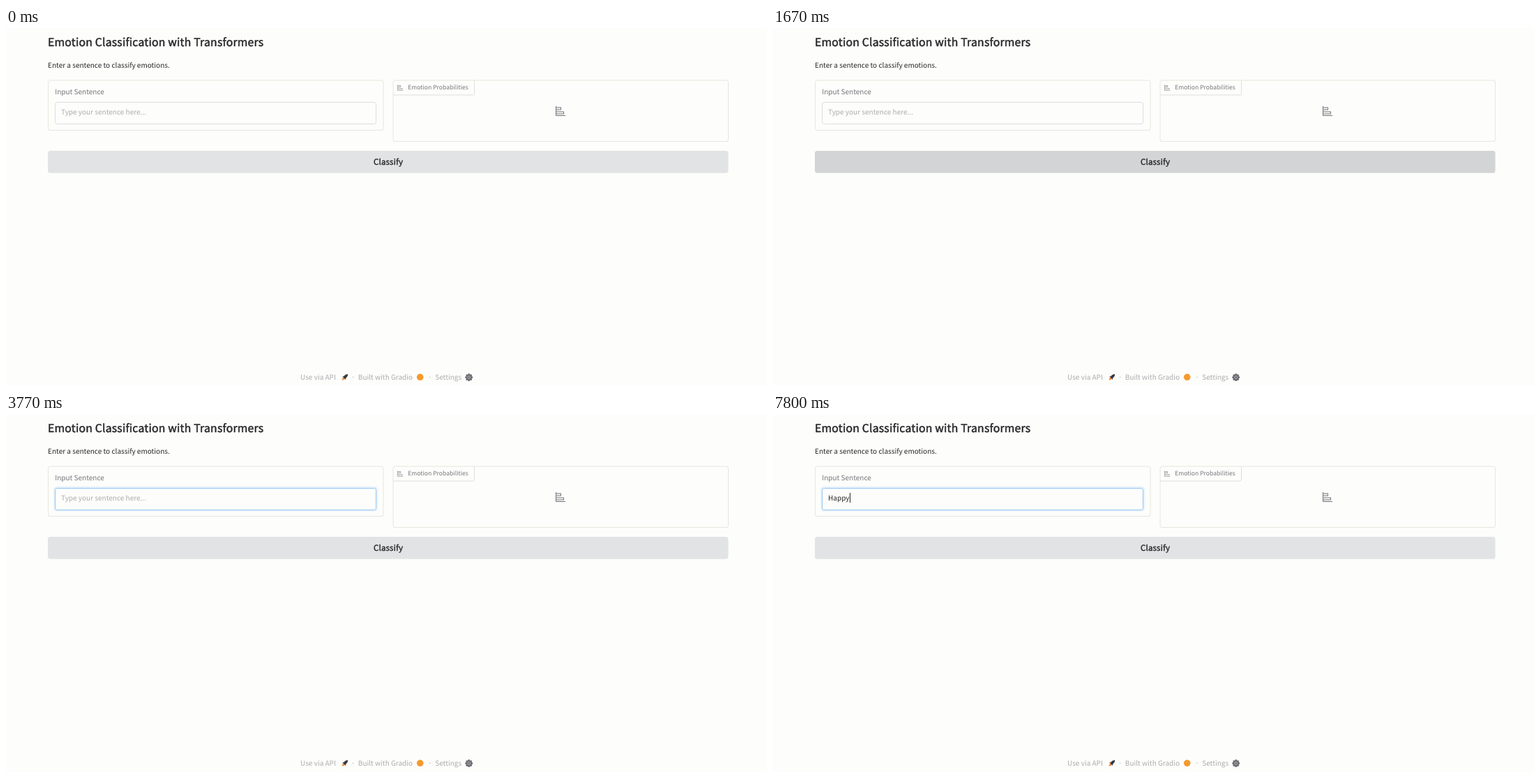
Write an HTML page with a canvas that moves like this. It is 1091 by 513 pixels and loops after 8000 ms.

```html
<!DOCTYPE html>
<html lang="en">
<head>
<meta charset="utf-8">
<title>Emotion Classification</title>
<style>
  html, body { margin: 0; width: 100%; height: 100%; overflow: hidden; background: #fdfdfb; }
  canvas { display: block; }
</style>
</head>
<body>
<canvas id="stage" width="1091" height="513"></canvas>
<script>
const ctx = document.getElementById('stage').getContext('2d');
const LOOP = 8000;
const BG = '#fdfdfb';
const INK = '#27272a';
const LABEL = '#76767c';
const FAINT = '#acacb0';
const FAMILY = '"Noto Sans CJK JP", "Noto Sans CJK SC", "Noto Sans CJK KR", "Noto Sans CJK TC", "Noto Sans CJK", sans-serif';
// The Latin glyphs in this family are drawn larger than their nominal em.
const EM = 1 / 1.117;

const chartIcon = new Path2D('M4 2H2v26a2 2 0 0 0 2 2h26v-2H4v-3h22v-8H4v-4h14V5H4zm20 17v4H4v-4zM16 7v4H4V7z');

// [start time, text in the box]
const typing = [
  [0, ''], [4230, 'H'], [4770, 'Ha'], [4870, 'Haa'], [4970, 'Ha'],
  [5300, 'Haa'], [6170, 'Ha'], [6630, 'Hap'], [6930, 'Happy']
];
// Times at which the caret toggles, starting hidden.
const blinks = [2230, 2770, 3270, 3770, 4230, 5800, 6170, 7430, 7730];

const clamp = v => Math.min(1, Math.max(0, v));
const ramp = (t, from, to) => {
  const p = clamp((t - from) / (to - from));
  return p * p * (3 - 2 * p);
};
const mix = (a, b, p) => `rgb(${a.map((v, i) => v + (b[i] - v) * p).join(',')})`;

function setFont(size) {
  ctx.font = `400 ${size * EM}px ${FAMILY}`;
  ctx.textRendering = 'geometricPrecision';
  ctx.fontKerning = 'normal';
}

function text(str, x, y, size, color, { align = 'left', weight = 0, spacing = 0 } = {}) {
  setFont(size);
  ctx.letterSpacing = spacing + 'px';
  ctx.textAlign = align;
  ctx.fillStyle = ctx.strokeStyle = color;
  ctx.fillText(str, x, y);
  if (weight) {
    ctx.lineWidth = weight;
    ctx.lineJoin = 'round';
    ctx.strokeText(str, x, y);
  }
  ctx.letterSpacing = '0px';
}

function box(x, y, w, h, r, fill, stroke) {
  ctx.beginPath();
  ctx.roundRect(x, y, w, h, r);
  if (fill) {
    ctx.fillStyle = fill;
    ctx.fill();
  }
  if (stroke) {
    ctx.strokeStyle = stroke;
    ctx.lineWidth = 1;
    ctx.stroke();
  }
}

function panel(x, y, w, h) {
  box(x, y + 0.6, w, h, 3, '#e0e0d4');
  box(x, y, w, h, 3, BG, '#e7e7e0');
}

function chart(x, y, scale, color) {
  ctx.save();
  ctx.translate(x, y);
  ctx.scale(scale, scale);
  ctx.fillStyle = color;
  ctx.fill(chartIcon, 'evenodd');
  ctx.restore();
}

function rocket(x, y) {
  ctx.save();
  ctx.translate(x, y);
  ctx.rotate(Math.PI / 4);
  ctx.fillStyle = '#f08a2c';
  ctx.beginPath();
  ctx.moveTo(-1.9, 1.2);
  ctx.lineTo(1.9, 1.2);
  ctx.lineTo(1.2, 4.4);
  ctx.lineTo(0, 6.2);
  ctx.lineTo(-1.2, 4.4);
  ctx.fill();
  ctx.fillStyle = '#37373d';
  ctx.beginPath();
  ctx.moveTo(0, -6);
  ctx.quadraticCurveTo(2.6, -3.4, 2, 0.2);
  ctx.lineTo(3.2, 2.6);
  ctx.lineTo(1.4, 1.8);
  ctx.lineTo(-1.4, 1.8);
  ctx.lineTo(-3.2, 2.6);
  ctx.lineTo(-2, 0.2);
  ctx.quadraticCurveTo(-2.6, -3.4, 0, -6);
  ctx.fill();
  ctx.restore();
}

function gear(x, y) {
  ctx.save();
  ctx.translate(x, y);
  ctx.fillStyle = '#69696f';
  for (let i = 0; i < 8; i++) {
    ctx.fillRect(-1.2, -5.4, 2.4, 3);
    ctx.rotate(Math.PI / 4);
  }
  ctx.beginPath();
  ctx.arc(0, 0, 4.3, 0, 7);
  ctx.fill();
  ctx.strokeStyle = '#b9b9bd';
  ctx.lineWidth = 1;
  ctx.beginPath();
  ctx.arc(0, 0, 1.9, 0, 7);
  ctx.stroke();
  ctx.restore();
}

function inputBox(t) {
  const focus = t < 2230 ? 0 : t < 2300 ? 0.6 : 1;
  if (focus) {
    ctx.globalAlpha = focus;
    box(68.2, 103.7, 465, 36.1, 5, '#e6f1fb');
    ctx.globalAlpha = 1;
  }
  box(70.5, 106.5, 460, 31, 3, BG, mix([221, 221, 226], [150, 199, 243], focus));

  const typed = typing.filter(([at]) => t >= at).pop()[1];
  if (typed) text(typed, 79, 124, 11.2, INK);
  else text('Type your sentence here...', 79, 124, 11.2, FAINT);

  const caretOn = blinks.filter(at => t >= at).length % 2;
  if (caretOn) {
    setFont(11.2);
    ctx.fillStyle = INK;
    ctx.fillRect(Math.round(79 + ctx.measureText(typed).width), 113, 1, 14);
  }
}

function outputPanel() {
  panel(555, 75, 480.5, 87.5);
  ctx.strokeStyle = '#dfdfdc';
  ctx.lineWidth = 1;
  ctx.beginPath();
  ctx.moveTo(671.5, 75.5);
  ctx.lineTo(671.5, 94);
  ctx.quadraticCurveTo(671.5, 96, 669.5, 96);
  ctx.lineTo(555, 96);
  ctx.stroke();
  chart(560.6, 80.8, 0.3, '#85858c');
  text('Emotion Probabilities', 576.2, 88, 9.6, LABEL);
  chart(787, 111, 0.5, '#73737c');
}

function button(t) {
  const hover = ramp(t, 1270, 1570) - ramp(t, 1670, 1970);
  box(60, 176, 975.5, 31.7, 3.5, mix([226, 227, 228], [211, 212, 213], hover));
  text('Classify', 548, 196, 12.8, INK, { align: 'center', weight: 0.4, spacing: 0.2 });
}

function footer() {
  const y = 504;
  text('Use via API', 422, y, 11.2, FAINT);
  rocket(486, 500.2);
  text('·', 497.6, y, 11.2, FAINT, { align: 'center' });
  text('Built with Gradio', 504.8, y, 11.2, FAINT);
  ctx.fillStyle = '#f59a2e';
  ctx.beginPath();
  ctx.arc(593.7, 500.3, 4.8, 0, 7);
  ctx.fill();
  text('·', 607.7, y, 11.2, FAINT, { align: 'center' });
  text('Settings', 615.2, y, 11.2, FAINT);
  gear(663.7, 500.6);
}

function draw(t) {
  ctx.fillStyle = BG;
  ctx.fillRect(0, 0, 1091, 513);
  text('Emotion Classification with Transformers', 60, 26, 17.6, INK, { weight: 0.5, spacing: 0.21 });
  text('Enter a sentence to classify emotions.', 60, 57, 11.2, INK);
  panel(60.5, 75, 480.5, 71.5);
  text('Input Sentence', 70.2, 95, 11.2, LABEL);
  inputBox(t);
  outputPanel();
  button(t);
  footer();
}

const start = performance.now();
function tick() {
  draw((performance.now() - start) % LOOP);
  requestAnimationFrame(tick);
}
tick();
</script>
</body>
</html>
```
